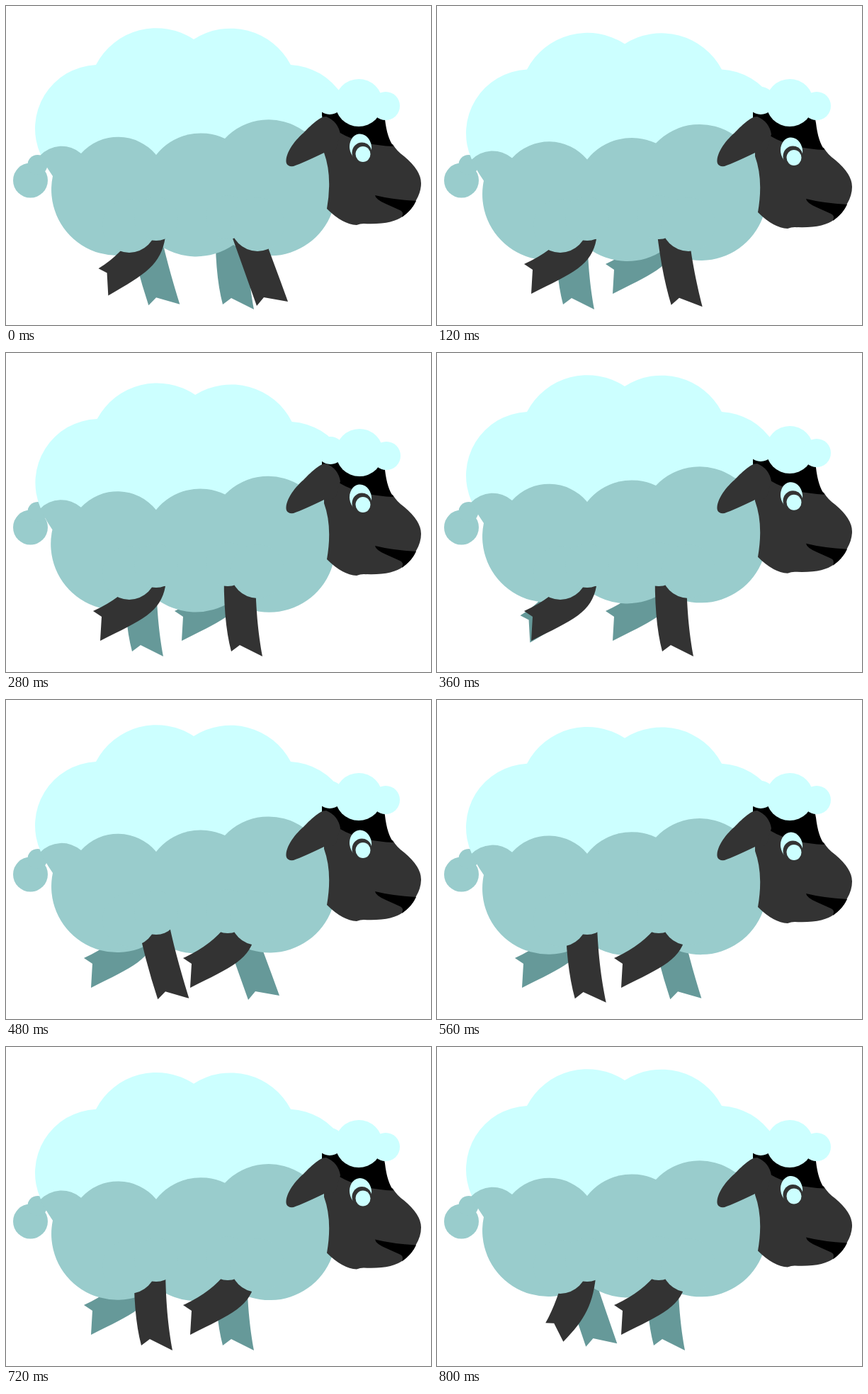
Write an HTML page that moves like this. It is 600 by 450 pixels and loops after 840 ms.

```html
<!DOCTYPE html>
<html lang="en">
<head>
<meta charset="utf-8">
<title>Walking sheep</title>
<style>
  html, body { margin: 0; width: 100%; height: 100%; overflow: hidden; background: #fff; }
  svg { display: block; width: 600px; height: 450px; }
  .light { fill: #cff; }
  .shade { fill: #9cc; }
  .far { fill: #699; }
  .dark { fill: #333; }
</style>
</head>
<body>
<svg viewBox="0 0 600 450">
  <path class="far" id="farBack"/>
  <path class="far" id="farFront"/>
  <g class="shade">
    <circle cx="34.5" cy="246" r="24.5"/>
    <circle cx="44.5" cy="224" r="14"/>
  </g>
  <g id="body">
    <path class="light" d="M127 83A96 96 0 0 1 265 47A96 96 0 0 1 402 83A90 90 0 0 1 480 209L49 210A90 90 0 0 1 127 83Z"/>
    <path class="shade" d="M48 211A42 42 0 0 1 106 208A70 70 0 0 1 212 210A80 80 0 0 1 309 187A85 85 0 0 1 420 176L456 190L463 236A93.5 93.5 0 0 1 321 337A92 92 0 0 1 212 334A93 93 0 0 1 66 240L60 231Z"/>
  </g>
  <path class="dark" id="nearBack"/>
  <path class="dark" id="nearFront"/>
  <g class="shade">
    <circle cx="174" cy="310" r="38"/>
    <circle cx="212" cy="300" r="31"/>
    <circle cx="313" cy="298" r="31"/>
    <circle cx="355" cy="308" r="38"/>
  </g>
  <g id="head">
    <path class="dark" d="M449 185V207Q461 240 453 286Q475 308 495 309Q500 307 505 307Q545 309 561 296Q575 286 579 274Q586 262 586 250Q586 232 562 212Q552 205 546 195L470 175Z"/>
    <path d="M450 185L446 154V145L450 135H530L535 160Q538 186 547 198Q500 196 470 178Z"/>
    <path d="M521 267Q545 273 579 275Q572 289 559 298Q562 290 556 288L536 279Q522 273 521 267Z"/>
    <ellipse class="light" cx="500.5" cy="199.5" rx="15.5" ry="19" transform="rotate(-8 500 199)"/>
    <ellipse class="dark" cx="502.5" cy="207" rx="14" ry="14.5"/>
    <ellipse class="light" cx="504" cy="209" rx="10.5" ry="11"/>
  </g>
  <path class="dark" d="M396 222C393 210 406 191 420 179C429 170 442 156 452 156Q469 163 472 181L465 205L449 207Q420 221 406 226Q398 227 396 222Z"/>
  <g class="light" id="tuft">
    <circle cx="457" cy="133.5" r="19.5"/>
    <circle cx="498" cy="136.5" r="33.5"/>
    <circle cx="536" cy="141" r="20"/>
  </g>
</svg>
<script>
const STEP = 40, STEPS = 21;
const get = id => document.getElementById(id);

// Outline points of a leg: hip, bend, hoof tip, notch, hoof tip, two bends, hip
const ahead  = [183,300, 205,361, 227,423, 237,411, 271,417, 257,378, 242,339, 228,300];
const behind = [181,300, 179,376, 191,421, 203,412, 235,428, 229,395, 225,360, 225,300];
const lifted = [184,318, 163,346, 123,364, 135,372, 133,406, 193,376, 218,366, 225,329];

// All legs share one gait, shifted in place and start step
const legs = [
  { id: "nearFront", x: 127, start: 0 },
  { id: "nearBack", x: 0, start: 10 },
  { id: "farFront", x: 115, start: 12 },
  { id: "farBack", x: -13, start: 19 }
];
const bob = [[0, 0], [5, 11], [7, 12], [9, 0], [16, 9.5], [20, 0]];

const mix = (a, b, k) => a + (b - a) * k;
const clamp = k => Math.min(1, Math.max(0, k));
const smooth = k => k * k * (3 - 2 * k);
const easeOut = k => 1 - (1 - k) ** 2;
const triangle = k => 1 - Math.abs(2 * k - 1);

function valueAt(keys, step) {
  const i = Math.max(1, keys.findIndex(key => key[0] >= step));
  const [s0, v0] = keys[i - 1], [s1, v1] = keys[i];
  return mix(v0, v1, (step - s0) / (s1 - s0));
}

// Push back, stand, then lift and hold until the next step forward
function legPath(phase) {
  const push = smooth(clamp(phase / 5)), lift = easeOut(clamp((phase - 9) / 3));
  const p = ahead.map((v, i) => mix(mix(v, behind[i], push), lifted[i], lift));
  const at = n => p[2 * n] + " " + p[2 * n + 1] + " ";
  return `M${at(0)}Q${at(1)}${at(2)}L${at(3)}L${at(4)}C${at(5)}${at(6)}${at(7)}Z`;
}

function move(id, x, y, angle = 0) {
  get(id).setAttribute("transform", `translate(${x} ${y}) rotate(${angle} 265 200)`);
}

function draw(now) {
  const step = Math.floor(now / STEP) % STEPS;
  for (const { id, x, start } of legs) {
    get(id).setAttribute("d", legPath((step - start + STEPS) % STEPS));
    move(id, x, 0);
  }
  const lean = clamp(1 - Math.abs(step - 7) / 2);
  const stride = step < 10 ? step / 10 : (step - 10) / 11;
  move("body", 0, valueAt(bob, step), lean * 0.8);
  move("head", 0, 8.3 * triangle(stride));
  move("tuft", lean, lean * 4);
  requestAnimationFrame(draw);
}

draw(performance.now());
</script>
</body>
</html>
```
